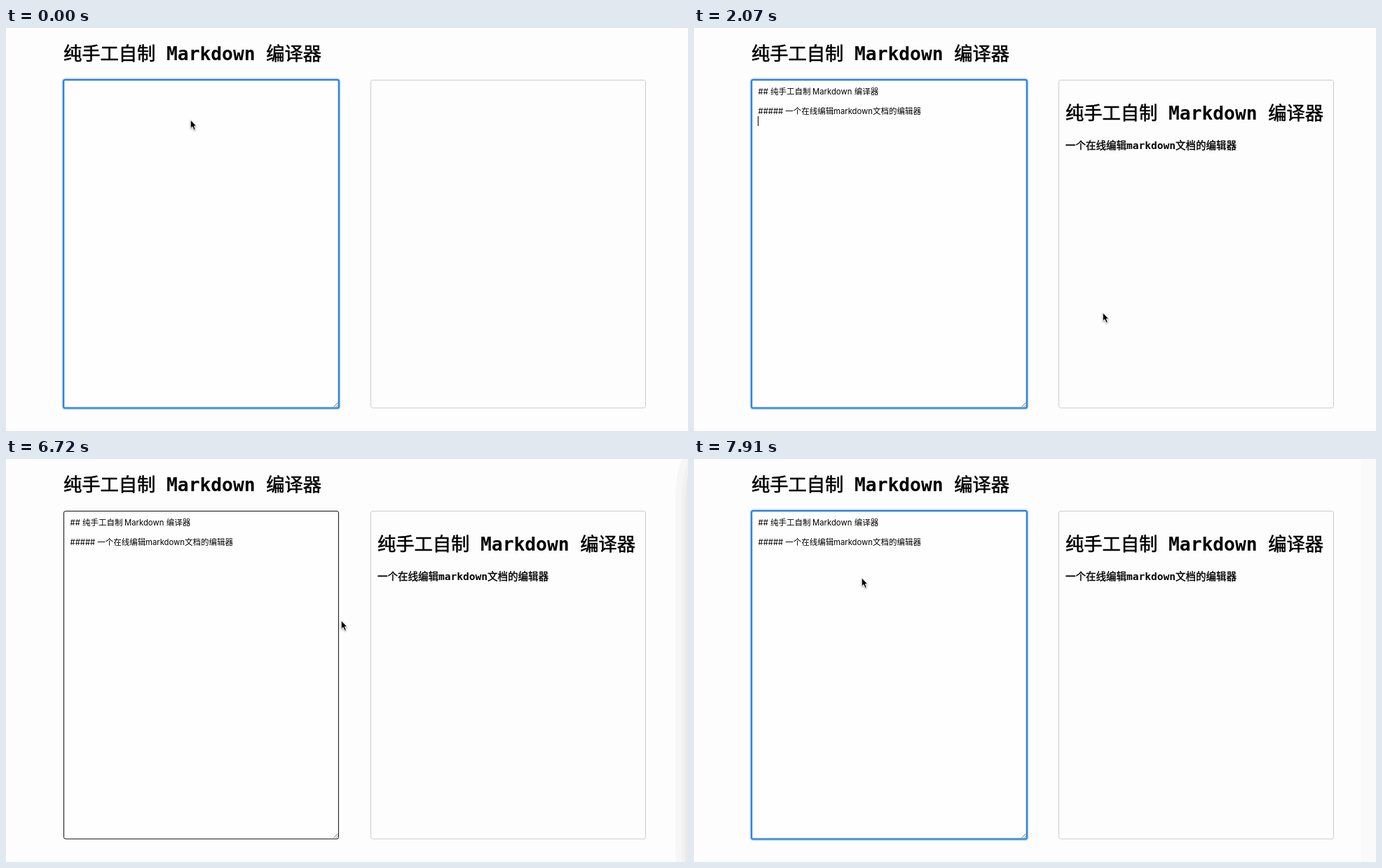
These frames come from a looping animation (973x576 px, 8 s). An HTML page:

```html
<!DOCTYPE html>
<html lang="zh-CN">
<head>
<meta charset="utf-8">
<title>Markdown 编译器</title>
<style>
  html, body { margin: 0; width: 100%; height: 100%; overflow: hidden; background: #fdfdfd; }
  svg { display: block; width: 973px; height: 576px; }

  .head { font: 700 26.25px "DejaVu Sans Mono", "Noto Sans CJK SC", monospace; }
  .sub { font-size: 14.53px; }
  .head .cjk { font-weight: 400; stroke: #000; stroke-width: .55px; }
  .sub .cjk { stroke-width: .4px; }
  .typed { font: 400 11.3px Inter, "Noto Sans CJK SC", sans-serif; }
  .typed .cjk { font-size: 11.5px; }

  .box { fill: none; stroke: #ccc; }
  .field { fill: #fefefe; stroke: #111; }
  .glow { fill: none; stroke: #b9dcfa; stroke-width: 4.6; }
  .ring { fill: none; stroke: #367fcd; stroke-width: 2; }
  .arrow { stroke: #fff; stroke-width: 1; filter: drop-shadow(0 1px 1px rgba(0, 0, 0, .35)); }
  .beam { fill: none; stroke: #222; }

  .anim { animation: 8s step-end infinite; }
  #source { animation-name: source; }
  #preview { animation-name: preview; }
  #focus { animation-name: focus; }
  #caret { animation-name: caret; }
  #pointer { animation-name: pointer; }
  #ibeam { animation-name: ibeam; }
  #shade { animation-name: shade; }
  #trace { animation-name: trace; }

  @keyframes source { 0% { opacity: 0 } 11.125% { opacity: 1 } 100% { opacity: 1 } }
  @keyframes preview { 0% { opacity: 0 } 13% { opacity: 1 } 100% { opacity: 1 } }
  @keyframes focus { 0% { opacity: 1 } 42.75% { opacity: 0 } 95.125% { opacity: 1 } 100% { opacity: 1 } }
  @keyframes shade { 0% { opacity: 0 } 42.75% { opacity: 1 } 93.25% { opacity: 0 } 100% { opacity: 0 } }
  @keyframes trace { 0% { opacity: 0 } 93.25% { opacity: 1 } 100% { opacity: 1 } }

  @keyframes caret {
    0% { opacity: 0; transform: translateY(83px) }
    3.625% { opacity: 1; transform: translateY(83px) }
    11.125% { opacity: 1; transform: translateY(126px) }
    16.75% { opacity: 0; transform: translateY(126px) }
    24% { opacity: 1; transform: translateY(126px) }
    29.625% { opacity: 0; transform: translateY(126px) }
    35.25% { opacity: 1; transform: translateY(126px) }
    42.75% { opacity: 0; transform: translateY(126px) }
    95.125% { opacity: 1; transform: translateY(126px) }
    98.875%, 100% { opacity: 0; transform: translateY(126px) }
  }

  @keyframes pointer {
    0% { opacity: 1; transform: translate(262px, 131.5px) }
    18.5% { opacity: 0; transform: translate(262px, 131.5px) }
    25.875% { opacity: 1; transform: translate(582px, 407px) }
    29.625% { opacity: 1; transform: translate(815px, 489px) }
    31.5% { opacity: 1; transform: translate(836px, 499.5px) }
    33.375% { opacity: 1; transform: translate(863px, 499.5px) }
    35.25% { opacity: 0; transform: translate(863px, 499.5px) }
    84% { opacity: 1; transform: translate(477px, 231px) }
    85.875% { opacity: 1; transform: translate(315px, 258px) }
    89.625% { opacity: 1; transform: translate(245px, 182px) }
    91.5%, 100% { opacity: 1; transform: translate(238px, 170px) }
  }

  @keyframes ibeam {
    0% { opacity: 0; transform: translate(284px, 150px) }
    18.5% { opacity: 1; transform: translate(284px, 150px) }
    20.375% { opacity: 1; transform: translate(390px, 252px) }
    24% { opacity: 1; transform: translate(449px, 295px) }
    25.875%, 100% { opacity: 0; transform: translate(449px, 295px) }
  }
</style>
</head>
<body>
<svg viewBox="0 0 973 576">
  <rect width="973" height="576" fill="#fdfdfd"/>

  <!-- edge of a neighbouring window -->
  <g id="shade" class="anim">
    <path fill="#f6f6f6" d="M965 0Q955 20 955 60V555Q955 568 957 576H973V0Z"/>
    <path fill="#f1f1f1" d="M973 4Q964 24 964 62V576H973Z"/>
    <path fill="#e9e9e9" d="M973 22Q969 40 969 75V576H973Z"/>
  </g>
  <rect id="trace" class="anim" x="952" width="21" height="576" fill="#fafafa"/>

  <text class="head" x="82" y="46"><tspan class="cjk">纯手工自制</tspan> Markdown <tspan class="cjk">编译器</tspan></text>

  <rect class="field" x="82.5" y="74.5" width="392" height="468.5" rx="2.5"/>
  <g id="focus" class="anim">
    <rect class="glow" x="81.8" y="73.8" width="393.4" height="469.7" rx="3"/>
    <rect class="ring" x="82" y="74" width="393" height="469.3" rx="2.5"/>
  </g>
  <path d="M467.5 541.5L473.5 535.5M471 541.5L473.5 539" stroke="#666" stroke-width=".9"/>
  <rect class="box" x="520.5" y="74.5" width="392" height="468.5" rx="2.5"/>

  <g id="source" class="anim typed">
    <text y="95"><tspan x="91.5">##</tspan><tspan class="cjk" x="109">纯手工自制</tspan><tspan x="169">Markdown</tspan><tspan class="cjk" x="228.8">编译器</tspan></text>
    <text y="123"><tspan x="91.5">#####</tspan><tspan class="cjk" x="130.3">一个在线编辑</tspan><tspan x="199">markdown</tspan><tspan class="cjk" x="255">文档的编辑器</tspan></text>
  </g>

  <g id="preview" class="anim">
    <text class="head" x="530" y="130.5"><tspan class="cjk">纯手工自制</tspan> Markdown <tspan class="cjk">编译器</tspan></text>
    <text class="head sub" x="530" y="173"><tspan class="cjk">一个在线编辑</tspan>markdown<tspan class="cjk">文档的编辑器</tspan></text>
  </g>

  <rect id="caret" class="anim" x="91" width="1" height="14"/>
  <g id="ibeam" class="anim">
    <path class="beam" d="M.5 .5Q3 .5 3 2.5V11.5Q3 13.5 .5 13.5M5.5 .5Q3 .5 3 2.5M3 11.5Q3 13.5 5.5 13.5"/>
  </g>
  <g id="pointer" class="anim">
    <path class="arrow" d="M1.2 -.3V12.2L4 9.6L6.1 14.4L8.4 13.4L6.4 8.8H10Z"/>
  </g>
</svg>
</body>
</html>
```
